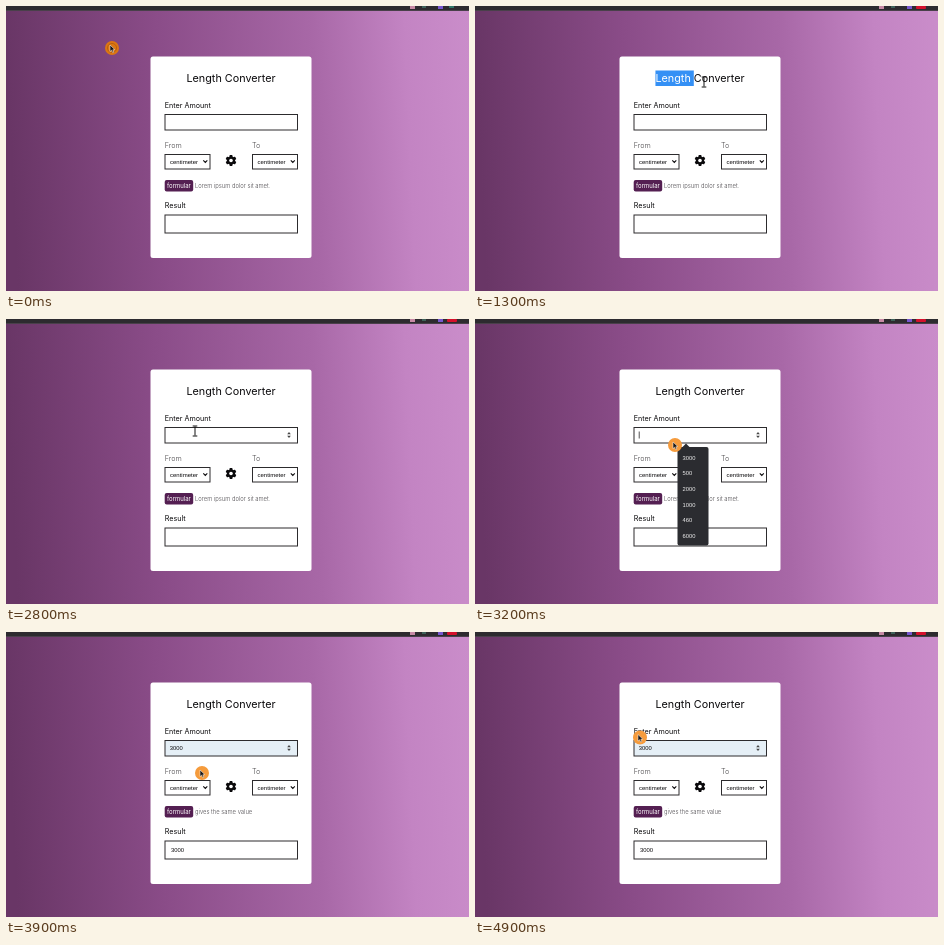
An HTML page with a canvas for the animation above (5 s loop, 463x285 px).

```html
<!DOCTYPE html>
<html lang="en">
<head>
<meta charset="utf-8">
<title>Length Converter</title>
<style>
  html, body { margin: 0; width: 100%; height: 100%; overflow: hidden; background: #8d4e8b; }
  canvas { display: block; width: 463px; height: 285px; }
</style>
</head>
<body>
<canvas id="stage"></canvas>
<script>
const W = 463, H = 285, LOOP = 5000, STEP = 100;
const SANS = 'Inter, sans-serif', FORM = '"Liberation Sans", Arial, sans-serif';
const INK = '#0b0a0c';
const canvas = document.getElementById('stage');
const ctx = canvas.getContext('2d');
const dpr = window.devicePixelRatio || 1;
canvas.width = W * dpr;
canvas.height = H * dpr;
ctx.scale(dpr, dpr);

// Pointer path: time, x, y
const path = [
  [0, 106, 42], [200, 112, 44], [700, 179, 74], [1000, 181, 75], [1300, 229, 76],
  [1700, 285, 76], [2100, 301, 76], [2400, 302, 77], [2800, 189, 112], [3000, 189, 114],
  [3400, 211, 138], [3600, 211, 139], [3900, 196, 141], [4300, 168, 141],
  [4700, 165, 107], [5000, 165, 105]
];

const within = (t, a, b) => t >= a && t < b;
const ease = p => p * p * (3 - 2 * p);

function pointerAt(t) {
  let i = 1;
  while (i < path.length - 1 && t > path[i][0]) i++;
  const [t0, x0, y0] = path[i - 1], [t1, x1, y1] = path[i];
  const p = ease((t - t0) / (t1 - t0));
  return { x: x0 + (x1 - x0) * p, y: y0 + (y1 - y0) * p };
}

function rect(x, y, w, h, fill, r = 0) {
  ctx.fillStyle = fill;
  ctx.beginPath();
  ctx.roundRect(x, y, w, h, r);
  ctx.fill();
}

function box(x, y, w, h, fill = '#fff') {
  rect(x, y, w, h, fill);
  ctx.strokeStyle = '#2c2b2d';
  ctx.lineWidth = 1;
  ctx.strokeRect(x, y, w, h);
}

function label(str, x, y, size, color = INK, weight = 400, family = SANS) {
  ctx.font = `${weight} ${size}px ${family}`;
  ctx.fillStyle = color;
  ctx.textBaseline = 'alphabetic';
  ctx.fillText(str, x, y);
}

function shape(points, fill) {
  ctx.beginPath();
  points.forEach(([x, y]) => ctx.lineTo(x, y));
  ctx.closePath();
  ctx.fillStyle = fill;
  ctx.fill();
}

function disc(x, y, r, fill) {
  ctx.fillStyle = fill;
  ctx.beginPath();
  ctx.arc(x, y, r, 0, Math.PI * 2);
  ctx.fill();
}

function backdrop(t) {
  const g = ctx.createLinearGradient(0, 20, W, 0);
  g.addColorStop(0, '#693666');
  g.addColorStop(0.32, '#8a4c88');
  g.addColorStop(0.66, '#a868a7');
  g.addColorStop(0.86, '#c384c3');
  g.addColorStop(1, '#ca8dca');
  ctx.fillStyle = g;
  ctx.fillRect(0, 0, W, H);
  rect(0, 0, W, 4, '#2d2b2f');
  rect(0, 4, W, 1, '#49404a');
  rect(404, 0, 5, 3, '#c78aa5');
  rect(416, 0, 4, 2, '#3f6259');
  rect(432, 0, 5, 3, '#7657cf');
  if (t < 500) rect(443, 0, 5, 2, '#2f7566');
  else rect(441, 0, 10, 3, '#d5102b', 1);
}

function title(t, pointer) {
  const str = 'Length Converter', size = 10.8, y = 76;
  ctx.font = `400 ${size}px ${SANS}`;
  const x = 225 - ctx.measureText(str).width / 2;
  label(str, x, y, size);
  if (!within(t, 1000, 2400)) return;
  let n = 0;
  const end = t >= 1700 ? W : pointer.x - 8;
  while (n < str.length && x + ctx.measureText(str.slice(0, n + 1)).width <= end) n++;
  if (!n) return;
  const part = str.slice(0, n);
  rect(x, 64.5, ctx.measureText(part).width, 15.5, '#3490f5');
  label(part, x, y, size, '#fff');
}

function select(x) {
  box(x, 148.5, 45, 14.5);
  label('centimeter', x + 5, 157.7, 6, INK, 400, FORM);
  ctx.strokeStyle = INK;
  ctx.lineWidth = 1.1;
  ctx.beginPath();
  ctx.moveTo(x + 38.3, 154.4);
  ctx.lineTo(x + 40.3, 156.4);
  ctx.lineTo(x + 42.3, 154.4);
  ctx.stroke();
}

function gear(x, y) {
  ctx.save();
  ctx.translate(x, y);
  for (let i = 0; i < 6; i++) {
    rect(-1.5, -5.4, 3, 4, INK, 0.7);
    ctx.rotate(Math.PI / 3);
  }
  disc(0, 0, 4.1, INK);
  disc(0, 0, 1.8, '#fff');
  ctx.restore();
}

function amount(t, pointer) {
  const filled = t >= 3400;
  const hover = pointer.y > 108 && pointer.y < 125 && pointer.x < 292;
  box(159, 108.5, 132.5, 15.5, filled ? '#e5eff6' : '#fff');
  if (filled) label('3000', 163.8, 118.2, 5.8, INK, 400, FORM);
  if (within(t, 3000, 3400) || within(t, 4200, 4700)) {
    rect(filled ? 176.8 : 163.8, 112.5, 0.7, 7, INK);
  }
  if (t >= 3000 || t > 2400 && hover) {
    shape([[281.2, 115.3], [283, 113], [284.8, 115.3]], '#444');
    shape([[281.2, 116.7], [283, 119], [284.8, 116.7]], '#444');
  }
}

function suggestions(t) {
  shape([[207, 128.5], [211, 124.5], [215, 128.5]], '#2b2c30');
  rect(202.5, 128, 31, 98.5, '#2b2c30', 2);
  if (t >= 3300) rect(203, 131, 30, 15.3, '#46474a');
  [3000, 500, 2000, 1000, 460, 6000].forEach((n, i) =>
    label(n, 207.5, 140.6 + i * 15.65, 5.8, '#f2f2f2', 400, FORM));
}

function form(t, pointer) {
  const done = t >= 3700;
  rect(144.5, 50.5, 161, 201.5, '#fff', 2.5);
  title(t, pointer);
  label('Enter Amount', 158.7, 102, 7.2);
  amount(t, pointer);
  label('From', 158.7, 141.5, 7.2, '#4a484b', 300);
  label('To', 246, 141.5, 7.2, '#4a484b', 300);
  select(159);
  select(246.5);
  gear(225, 154.5);
  rect(158.7, 174, 28.5, 11.5, '#541f52', 2);
  label('formular', 161, 182, 6, '#fff');
  label(done ? 'gives the same value' : 'Lorem ipsum dolor sit amet.',
    189, 182, 5.85, '#4f4c50', 300);
  label('Result', 158.7, 202.3, 7.2);
  box(159, 209, 132.5, 18);
  if (done) label('3000', 165, 220.2, 5.9, INK, 400, FORM);
}

function overText({ x, y }) {
  const hit = (l, t, r, b) => x >= l && x <= r && y >= t && y <= b;
  return hit(179, 65, 271, 80) || hit(159, 95, 206, 104) ||
    hit(159, 108, 280, 124) || hit(159, 134, 177, 146);
}

function beam(x, y) {
  ctx.strokeStyle = '#111';
  ctx.lineWidth = 1;
  ctx.beginPath();
  ctx.moveTo(x, y - 4.5);
  ctx.lineTo(x, y + 4.5);
  for (const d of [-5, 5]) {
    ctx.moveTo(x - 2.3, y + d);
    ctx.lineTo(x + 2.3, y + d);
  }
  ctx.stroke();
}

function arrow(x, y, pressed) {
  disc(x, y, 7, pressed ? '#dc7612' : '#f59b3c');
  if (pressed) {
    ctx.strokeStyle = '#b9600f';
    ctx.lineWidth = 1;
    ctx.beginPath();
    ctx.arc(x, y, 4.6, 0, Math.PI * 2);
    ctx.stroke();
  }
  const tip = [[0, 0], [0, 6.6], [1.6, 5.2], [2.7, 7.6], [3.8, 7.1], [2.8, 4.8], [4.8, 4.6]];
  shape(tip.map(([a, b]) => [x - 2 + a, y - 3 + b]), '#1b1715');
  ctx.strokeStyle = '#fff';
  ctx.lineWidth = 0.5;
  ctx.stroke();
}

function draw(t) {
  const pointer = pointerAt(t);
  const open = within(t, 3000, 3600);
  backdrop(t);
  form(t, pointer);
  if (open) suggestions(t);
  if (overText(pointer) && !(open && pointer.y > 127)) beam(pointer.x, pointer.y);
  else arrow(pointer.x, pointer.y, t < 100 || within(t, 2400, 2500) || within(t, 3500, 3600));
}

const start = performance.now();
function tick() {
  const t = (performance.now() - start) % LOOP;
  draw(Math.floor(t / STEP) * STEP);
  requestAnimationFrame(tick);
}
tick();
</script>
</body>
</html>
```
